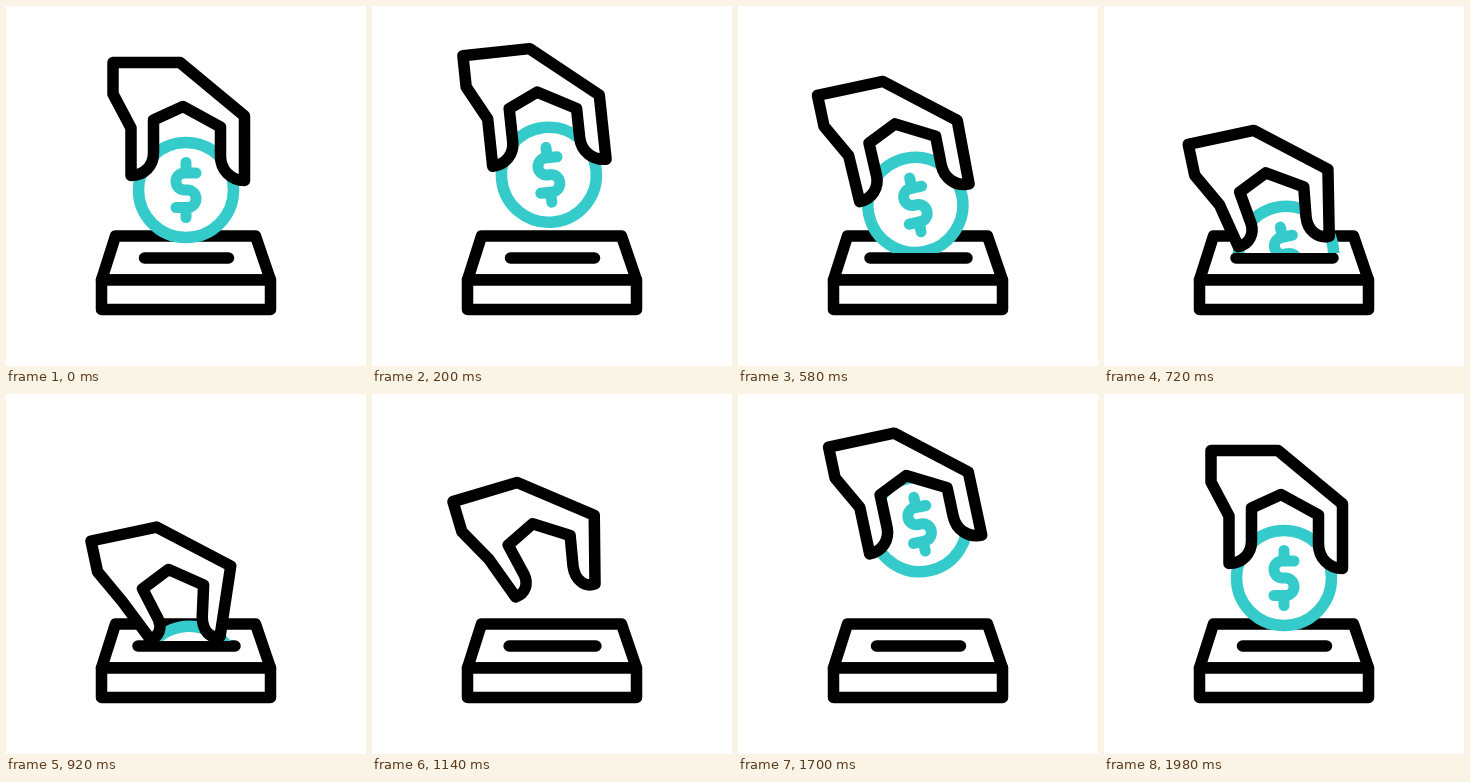
Write an HTML page that moves like this. It is 360x360 px and loops after 2400 ms.

```html
<!DOCTYPE html>
<html lang="en">
<head>
<meta charset="utf-8">
<title>Coin donation</title>
<style>
  html, body { margin: 0; width: 100%; height: 100%; overflow: hidden; background: #fff; }
  svg { display: block; width: 100vw; height: 100vh; }
  path, circle { fill: #fff; stroke: #000; stroke-width: 11.5; stroke-linecap: round; stroke-linejoin: round; }
  #coin * { stroke: #36cbcb; }
  #coin path { fill: none; stroke-width: 11; }
</style>
</head>
<body>
<svg viewBox="0 0 360 360">
  <clipPath id="aboveSlot"><rect width="360" height="247"/></clipPath>
  <clipPath id="belowPalm"><rect id="palmEdge" x="-400" width="1200" height="1200"/></clipPath>

  <path d="M109.5 230H249.5L264.5 274H95.5Z"/>
  <path d="M95.5 274H264.5V303.5H95.5Z"/>
  <path id="slot"/>
  <g clip-path="url(#aboveSlot)">
    <g id="grip" clip-path="url(#belowPalm)">
      <g id="coin">
        <circle cx="180" cy="184" r="47.5"/>
        <path d="M190 167H178.5a8.5 8.5 0 0 0 0 17h3a8.5 8.75 0 0 1 0 17.5H170M180 156.5v10M180 201.5v10"/>
      </g>
    </g>
  </g>
  <path id="hand"/>
</svg>
<script>
const LOOP = 2400, PUSHED = 900, GONE = 1040, REFILL = 1480;
const [slot, grip, coin, hand, palmEdge] =
  ["slot", "grip", "coin", "hand", "palmEdge"].map(id => document.getElementById(id));

// Eased progress from 0 to 1 between two times.
function ramp(t, from, to) {
  const u = Math.min(1, Math.max(0, (t - from) / (to - from)));
  return u * u * (3 - 2 * u);
}

// Lift, drop to the slot, withdraw, then return to rest.
function pose(t) {
  const lift = ramp(t, 0, 400), drop = ramp(t, 400, 790);
  const leave = ramp(t, 940, 1400), back = ramp(t, 1485, 1925);
  const x = 107 - 32 * (lift - back) + 10 * (drop - leave);
  const y = 56.5 - 13.5 * lift + 104 * drop - 97 * leave + 6.5 * back;
  const turn = -12 * lift - 11.4 * leave + 23.4 * back;
  return `translate(${x} ${y}) rotate(${turn}) translate(-107 -56.5)`;
}

// Both fingertips slide inwards as the pinch grows from 0 to 1.
function handPath(pinch) {
  const p = (x, y, dx, dy) => `${x + dx * pinch} ${y + dy * pinch} `;
  return `M107 56.5H174L238.5 110
    L${p(238.5, 174.5, -25, 2)}
    C${p(225, 174.5, -22, 3)}${p(214.5, 164, -17, 3)}${p(214.5, 150, -14.5, 4)}
    L${p(214.5, 121, -6.5, 2)}L177 100.5 147.5 114
    L${p(147.5, 147, 9, 0)}
    C${p(147.5, 160, 11, -4)}${p(138, 169.5, 16, -5)}${p(125, 169.5, 19.5, -5)}
    L125 122 107 88Z`;
}

function draw(t) {
  const pinch = ramp(t, 520, 920) - 0.6 * ramp(t, 940, 1400) - 0.4 * ramp(t, 1400, 1650);
  hand.setAttribute("d", handPath(pinch));
  hand.setAttribute("transform", pose(t));

  const half = 42 + 6.5 * (ramp(t, 300, 500) - ramp(t, 1000, 1200));
  slot.setAttribute("d", `M${180.5 - half} 252h${2 * half}`);

  // The coin sinks into the slot, then a new one slides out of the palm.
  const refilled = t >= REFILL;
  const held = refilled ? t : Math.min(t, PUSHED);
  const sink = refilled ? 0 : 46 * ramp(t, 800, GONE);
  const slide = refilled ? 130 * (ramp(t, REFILL, 1810) - 1) : 0;
  grip.setAttribute("transform", `translate(0 ${sink}) ${pose(held)}`);
  grip.setAttribute("visibility", t < GONE || refilled ? "visible" : "hidden");
  palmEdge.setAttribute("y", refilled ? 95 : -400);
  coin.setAttribute("transform", `translate(0 ${slide})`);
}

const start = performance.now();
function tick() {
  draw((performance.now() - start) % LOOP);
  requestAnimationFrame(tick);
}
tick();
</script>
</body>
</html>
```
